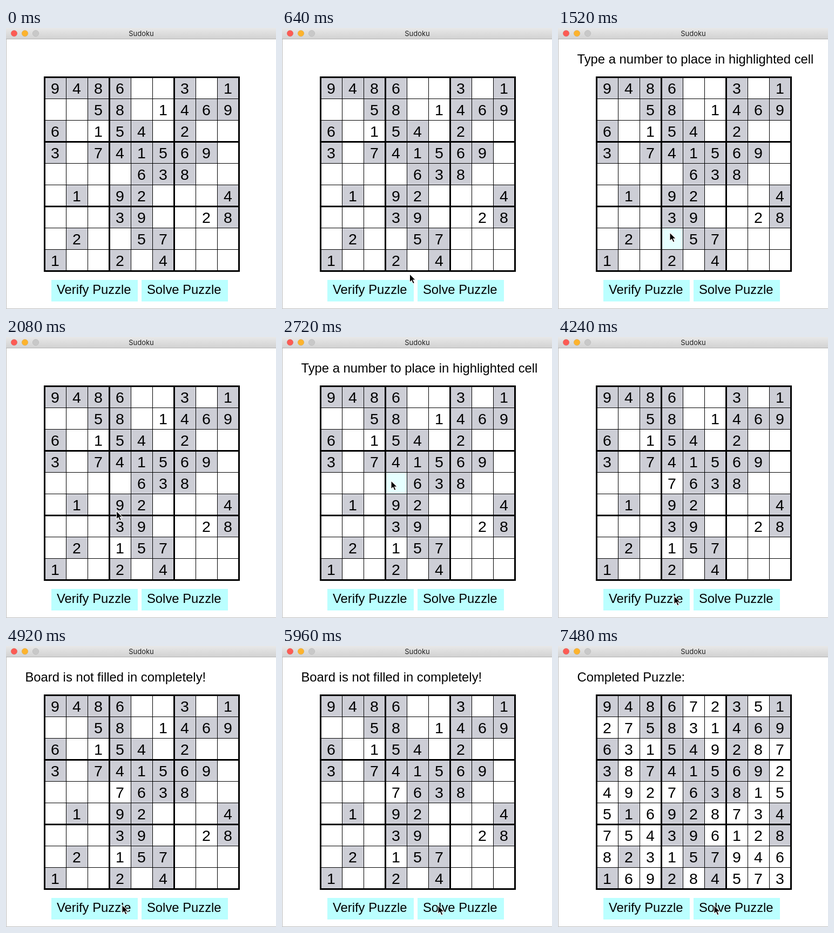
Write an HTML page that moves like this. It is 500 by 522 pixels and loops after 7520 ms.

```html
<!DOCTYPE html>
<html lang="en">
<head>
<meta charset="utf-8">
<title>Sudoku</title>
<style>
  html, body { margin: 0; width: 100%; height: 100%; overflow: hidden; background: #fff; }
  svg { display: block; width: 500px; height: 522px; }
  text { font-family: "Liberation Sans", Arial, sans-serif; font-size: 23.8px; }
  .digit { font-size: 28.5px; text-anchor: middle; }
  .title { font: 13px Inter, sans-serif; text-anchor: middle; fill: #222; }
</style>
</head>
<body>
<svg id="stage" viewBox="0 0 500 522">
  <defs>
    <linearGradient id="bar" x2="0" y2="1">
      <stop stop-color="#e8e8e8"/><stop offset="1" stop-color="#d2d2d2"/>
    </linearGradient>
  </defs>
  <rect width="500" height="522" fill="#fff"/>
  <rect width="500" height="20" fill="url(#bar)"/>
  <path d="M0 20.5H500" stroke="#b4b4b4"/>
  <path d="M.5 21V521.5H500" fill="none" stroke="#bcbcbc"/>
  <text class="title" x="250.5" y="15">Sudoku</text>
</svg>
<script>
const LOOP = 7520, CELL = 40, LEFT = 71.5, TOP = 91.5;
const given = [
  "9486..3.1", "..58..469", "6..54.2..", "3.741569.", "....638..",
  ".1.92...4", "...39...8", ".2..57...", "1..2.4..."
];
const solved = [
  "948672351", "275831469", "631549287", "387415692", "492763815",
  "516928734", "754396128", "823157946", "169284573"
];
const PROMPT = "Type a number to place in highlighted cell";

// When cells outside the givens are filled, by "row,col"
const SOLVE = 6360;
const filledAt = { "1,5": 0, "2,2": 0, "6,7": 0, "7,3": 1740, "4,3": 3200 };
const selections = [
  { from: 1080, to: 1740, row: 7, col: 3 },
  { from: 2400, to: 3200, row: 4, col: 3 }
];
const messages = [
  [0, ""], [1080, PROMPT], [1740, ""], [2400, PROMPT], [3200, ""],
  [4440, "Board is not filled in completely!"], [SOLVE, "Completed Puzzle:"]
];
// Pointer keys: time, x, y
const pointer = [
  [350, 262, 524], [960, 207, 380], [1840, 207, 380], [2320, 202, 267],
  [3300, 202, 267], [4150, 215, 481], [5060, 215, 481], [5700, 289, 482]
];

const stage = document.getElementById("stage");
function add(tag, attrs, text = "") {
  const node = document.createElementNS("http://www.w3.org/2000/svg", tag);
  for (const key in attrs) node.setAttribute(key, attrs[key]);
  node.textContent = text;
  return stage.appendChild(node);
}

["#fc5b54", "#fdb32d", "#c8c8c8"].forEach((fill, i) =>
  add("circle", { cx: 15 + 20 * i, cy: 10, r: 5.8, fill, stroke: "#0002", "stroke-width": .6 }));

function cellRect(row, col, fill) {
  return add("rect", { x: LEFT + col * CELL, y: TOP + row * CELL, width: CELL, height: CELL, fill });
}
given.forEach((line, row) => [...line].forEach((n, col) => {
  if (n !== ".") cellRect(row, col, "#cdced6");
}));
const highlights = selections.map(s => ({ ...s, node: cellRect(s.row, s.col, "#e6ffff") }));

const hidden = [];
solved.forEach((line, row) => [...line].forEach((n, col) => {
  const node = add("text", { class: "digit", x: LEFT + 19.5 + col * CELL, y: TOP + 30.5 + row * CELL }, n);
  if (given[row][col] === ".") hidden.push({ node, from: filledAt[row + "," + col] ?? SOLVE });
}));

function gridLines(width, wanted) {
  let d = "";
  for (let i = 0; i < 10; i++) {
    if (wanted(i)) d += `M${LEFT + i * CELL} ${TOP}v360M${LEFT} ${TOP + i * CELL}h360`;
  }
  add("path", { d, stroke: "#000", "stroke-width": width, "stroke-linecap": "square" });
}
gridLines(1, i => i % 3);
gridLines(3, i => i % 3 === 0);

[[84, "Verify Puzzle"], [251, "Solve Puzzle"]].forEach(([x, label]) => {
  add("rect", { x, y: 468, width: 160, height: 40, fill: "#bbffff" });
  add("text", { x: x + 10, y: 494 }, label);
});

const message = add("text", { x: 35.5, y: 66 });
const arrow = add("path", {
  d: "M0 0V15.5L3.6 12.2L6.2 18L9 16.8L6.5 11.2H11.2Z",
  fill: "#000", stroke: "#fff", "stroke-width": 1.1
});

function pointerAt(t) {
  const i = pointer.findIndex(key => key[0] > t);
  if (i < 0) return pointer[pointer.length - 1].slice(1);
  if (i === 0) return pointer[0].slice(1);
  const [t0, x0, y0] = pointer[i - 1], [t1, x1, y1] = pointer[i];
  const u = (t - t0) / (t1 - t0), k = u * u * (3 - 2 * u);
  return [x0 + (x1 - x0) * k, y0 + (y1 - y0) * k];
}

const show = (node, on) => node.setAttribute("visibility", on ? "visible" : "hidden");

function render(t) {
  hidden.forEach(({ node, from }) => show(node, t >= from));
  highlights.forEach(({ node, from, to }) => show(node, t >= from && t < to));
  message.textContent = messages.filter(([from]) => t >= from).pop()[1];
  arrow.setAttribute("transform", `translate(${pointerAt(t)})`);
}

const start = performance.now();
function tick() {
  render((performance.now() - start) % LOOP);
  requestAnimationFrame(tick);
}
render(0);
requestAnimationFrame(tick);
</script>
</body>
</html>
```
